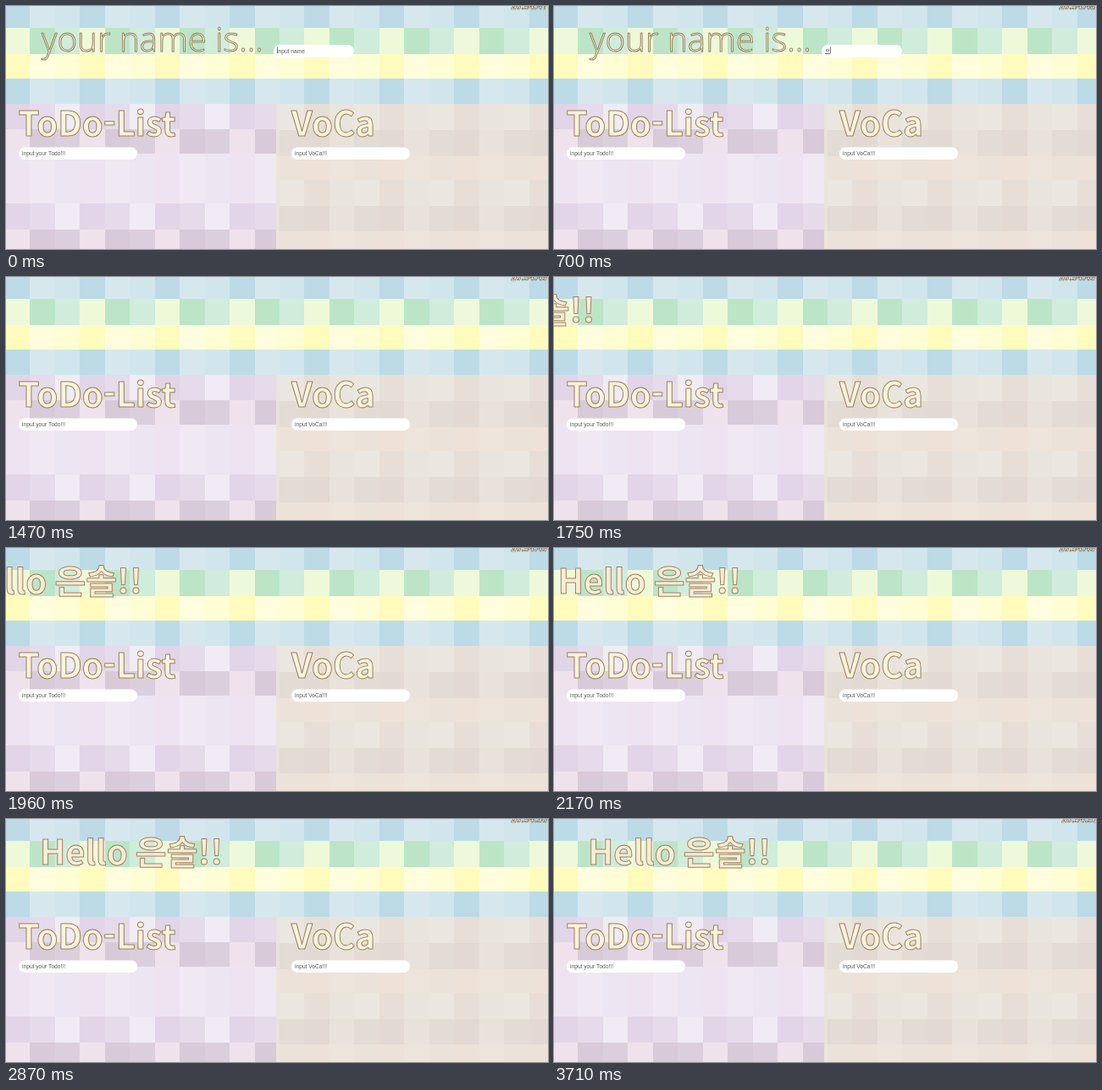
An HTML page with a canvas that plays this animation: 640 px wide and 288 px high, repeating every 3780 ms.

```html
<!DOCTYPE html>
<html lang="ko">
<head>
<meta charset="utf-8">
<style>
  html, body { margin: 0; width: 100%; height: 100%; overflow: hidden; }
  canvas { display: block; }
</style>
</head>
<body>
<canvas id="stage" width="640" height="288"></canvas>
<script>
const ctx = document.getElementById('stage').getContext('2d');
const LOOP = 3780, STEP = 70, SECOND = 1050, FIRST_TICK = 420;
const CJK = '"Noto Sans CJK KR", "Noto Sans CJK", "Noto Sans", sans-serif';
const LIGHT = '"Open Sans", "Noto Sans", sans-serif';
const UI = '"Liberation Sans", Arial, sans-serif';
const HEADING = 'bold 40px ' + CJK;
const NAME = '은솔';
const CELL = 29.47, CELL_START = -1.2;

const blue = ['#bcdbe7', '#d6e8ee', '#d0e6ec'];
const green = ['#eef9d9', '#bce5c8', '#d0ecdb'];
const yellow = ['#fffbbd', '#fffddd', '#fffdd4'];
const lilac = ['#e1d5e7', '#e5dbeb', '#f0ebf4'];
const mauve = ['#f0e2ec', '#d8cad9', '#dccfdd'];
const lavender = ['#eee4f1', '#f0e8f3', '#ece5f2'];
const sand = ['#e7dfd7', '#e9e4dd', '#ebe7e0'];
const taupe = ['#e2dad2', '#e8e2db', '#e3dcd5'];
const peach = ['#eee2d8', '#ede4db', '#ebe2d9'];

// Each row: top, bottom, repeating colours.
const topRows = [[0, 26, blue], [26, 57, green], [57, 86, yellow], [86, 116, blue]];
const leftRows = [[116, 146, lilac], [146, 175, mauve], [175, 205, lavender],
  [205, 234, lavender], [234, 265, lilac], [265, 288, mauve]];
const rightRows = [[116, 147, sand], [147, 178, taupe], [178, 206, peach],
  [206, 237, sand], [237, 267, taupe], [267, 288, peach]];

// Typed text over time: start, finished syllables, syllable being composed.
const typing = [[630, '', 'ㅇ'], [770, '', '으'], [840, '', '은'],
  [980, '은', 'ㅅ'], [1120, '은', '소'], [1260, '은', '솔']];
const SUBMIT = 1400, SLIDE_START = 1555, SLIDE_DISTANCE = 282;

// The standard "ease" curve: cubic-bezier(.25, .1, .25, 1).
function ease(x) {
  if (x <= 0 || x >= 1) return x <= 0 ? 0 : 1;
  const curve = (u, a, b) => 3 * u * (1 - u) ** 2 * a + 3 * u * u * (1 - u) * b + u ** 3;
  let low = 0, high = 1;
  for (let i = 0; i < 20; i++) {
    const mid = (low + high) / 2;
    if (curve(mid, .25, .25) < x) low = mid; else high = mid;
  }
  return curve(low, .1, 1);
}

function drawRows(rows, left, right) {
  for (const [top, bottom, colors] of rows) {
    for (let i = 0; CELL_START + i * CELL < right; i++) {
      const x0 = Math.max(left, Math.round(CELL_START + i * CELL));
      const x1 = Math.min(right, Math.round(CELL_START + (i + 1) * CELL));
      if (x1 <= x0) continue;
      ctx.fillStyle = colors[i % colors.length];
      ctx.fillRect(x0, top, x1 - x0, bottom - top);
    }
  }
}

function outlined(text, x, y, font, fill = '#fff2da', stroke = '#95805c', width = 1) {
  ctx.font = font;
  ctx.lineJoin = 'round';
  ctx.lineWidth = width;
  ctx.fillStyle = fill;
  ctx.strokeStyle = stroke;
  ctx.fillText(text, x, y);
  ctx.strokeText(text, x, y);
}

function label(text, x, y, color = '#5c5c5c') {
  ctx.font = '6.67px ' + UI;
  ctx.fillStyle = color;
  ctx.fillText(text, x, y);
}

function inputBox(x, y, width, placeholder) {
  ctx.fillStyle = '#fff';
  ctx.beginPath();
  ctx.roundRect(x, y, width, 14.5, 7);
  ctx.fill();
  label(placeholder, x + 4, y + 9.5);
}

function drawNameForm(t) {
  outlined('your name is...', 42, 54, '300 40.3px ' + LIGHT);
  const typed = typing.filter(([start]) => t >= start).pop();
  inputBox(316, 46, 95, typed ? '' : 'input name');
  let caret = 320;
  if (typed) {
    const [, done, composing] = typed;
    label(done + composing, 320, 55, '#222');
    const start = 320 + ctx.measureText(done).width;
    caret = 320 + ctx.measureText(done + composing).width;
    ctx.fillRect(start, 56, caret - start, .7);
  }
  ctx.fillStyle = '#222';
  ctx.fillRect(caret, 49, .6, 7);
}

function drawGreeting(t) {
  const shift = -SLIDE_DISTANCE * (1 - ease((t - SLIDE_START) / SECOND));
  outlined(`Hello ${NAME}!!`, 40 + shift, 54, HEADING, '#f9ecd5', '#a0805f');
}

function drawClock(t) {
  const second = 48 + Math.floor((t - FIRST_TICK) / SECOND);
  const x = second === 51 ? 599 : 596;
  outlined('20:54:' + second, x, 4, 'bold 10.3px ' + CJK, '#fff8ea', '#6b5434', .6);
}

function draw(t) {
  drawRows(topRows, 0, 640);
  drawRows(leftRows, 0, 319);
  drawRows(rightRows, 319, 640);
  outlined('ToDo-List', 14.5, 153.5, HEADING);
  outlined('VoCa', 337, 153.5, HEADING);
  inputBox(15, 167.5, 140, 'input your Todo!!!');
  inputBox(337, 167.5, 140, 'input VoCa!!!');
  if (t < SUBMIT) drawNameForm(t);
  else drawGreeting(t);
  drawClock(t);
}

function frame() {
  const t = performance.now() % LOOP;
  draw(Math.floor(t / STEP) * STEP);
  requestAnimationFrame(frame);
}
frame();
</script>
</body>
</html>
```
